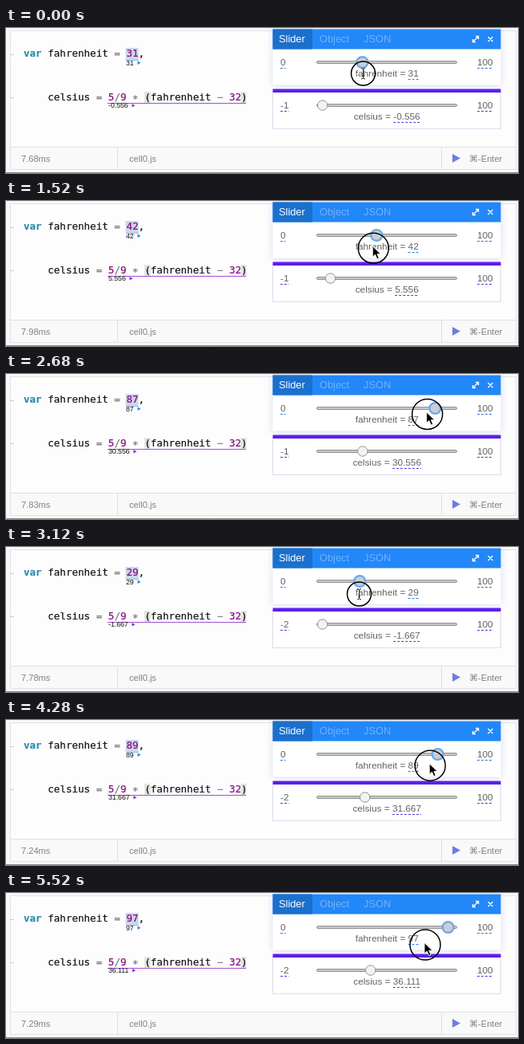
Recreate the animation shown at these times as an HTML page. Size 640x182 px, loop 5560 ms.

```html
<!DOCTYPE html>
<html lang="en">
<head>
<meta charset="utf-8">
<title>Temperature sliders</title>
<style>
  html, body { margin: 0; width: 100%; height: 100%; overflow: hidden; background: #fff; }
  svg { display: block; width: 100vw; height: 100vh; }
  text { font-family: "Liberation Sans", Arial, sans-serif; font-size: 11.8px; fill: #626262; }
  .code text {
    font-family: "DejaVu Sans Mono", monospace; font-size: 12.55px;
    color: #111; fill: currentColor; stroke: currentColor; stroke-width: .2;
  }
  .code tspan { fill: currentColor; stroke: currentColor; }
  .code .num { color: #86107f; }
  .code .op { color: #777; }
  .code .key { color: #2b8cab; font-weight: bold; }
  .code text.hint { font-family: "Liberation Sans", Arial, sans-serif; font-size: 8.7px; stroke: none; }
  .in { color: #2a86e2; }
  .out { color: #7a35d8; }
  .dash { stroke-width: 1; stroke-dasharray: 3 2; }
  .tabs text { font-size: 12.8px; fill: #6fb2fa; }
  .footer text { font-size: 11.1px; fill: #808080; }
  .panel { filter: drop-shadow(0 1px 5px rgba(90, 90, 210, .22)); }
</style>
</head>
<body>
<svg viewBox="0 0 640 182" preserveAspectRatio="none">
  <rect width="640" height="182" fill="#f8f8f8"/>
  <rect x="5.5" y="3.5" width="632" height="174" fill="#fdfdfd" stroke="#e2e2e4"/>
  <path d="M5 33.5h5M5 87.5h5" stroke="#ccc"/>

  <g class="code">
    <rect x="149.5" y="25" width="16" height="15" fill="#cbd7ea"/>
    <rect x="173" y="80" width="7.5" height="14" fill="#dfe4df"/>
    <rect x="293.5" y="80" width="7" height="14" fill="#dfe4df"/>
    <text x="22" y="36"><tspan class="key">var</tspan> fahrenheit <tspan class="op">=</tspan> <tspan class="num" id="literal"></tspan>,</text>
    <text x="52.3" y="90.5">celsius <tspan class="op">=</tspan> <tspan class="num">5</tspan><tspan class="op">/</tspan><tspan class="num">9</tspan> <tspan class="op">∗</tspan> (fahrenheit <tspan class="op">−</tspan> <tspan class="num">32</tspan>)</text>
    <path d="M150 40.5h16" stroke="#2a86e2" stroke-opacity=".5"/>
    <path d="M127 94.5h173" stroke="#a24fd6"/>
    <text class="hint in" id="inHint" x="150" y="46.5"></text>
    <path class="in" id="inMark" d="M0 41.5l4 2.2l-4 2.2z" fill="currentColor"/>
    <text class="hint out" id="outHint" x="128" y="100"></text>
    <path class="out" id="outMark" d="M0 95l4 2.2l-4 2.2z" fill="currentColor"/>
  </g>

  <g class="footer">
    <rect x="6" y="150" width="631" height="27" fill="#f9f9fa"/>
    <path d="M6 149.5H637M139.5 149V177M544.5 149V177" stroke="#e0e0e4" fill="none"/>
    <path d="M0 181.5H640" stroke="#8a8a8a"/>
    <text id="elapsed" x="19" y="168"></text>
    <text x="154" y="168">cell0.js</text>
    <path d="M558 158l10 5.5l-10 5.5z" fill="#6f7ce0"/>
    <text x="579" y="168" style="font-family:'Liberation Sans','DejaVu Sans',sans-serif">⌘-Enter</text>
  </g>

  <rect class="panel" x="333.5" y="1.5" width="285" height="70" fill="#fff"/>
  <g class="tabs">
    <rect x="333.5" y="1.5" width="285" height="25" fill="#2287f8"/>
    <rect x="333.5" y="1.5" width="49.5" height="25" fill="#1a70cc"/>
    <text x="341" y="18" style="fill:#fff">Slider</text>
    <text x="392" y="18">Object</text>
    <text x="447" y="18">JSON</text>
    <path d="M584 17l6 -6M587 10.5h3.5v3.5M583.5 14v3.5h3.5M602.5 11l6 6M608.5 11l-6 6" stroke="#fff" stroke-width="1.4" fill="none"/>
  </g>
  <rect x="333.5" y="79.5" width="285" height="47" fill="#fff" stroke="#dcdcf2"/>
  <rect x="333.5" y="76.5" width="285" height="4.5" fill="#5c1fea"/>
  <g id="sliders"></g>

  <g id="cursor">
    <circle id="halo" fill="none" stroke="#000" stroke-width="1.5"/>
    <path id="arrow" d="M-1 -2.5V11L2.2 8.1L4.6 13.5L7 12.5L4.7 7.3H9z" fill="#000" stroke="#fff" stroke-width=".9"/>
    <path id="beam" d="M-2.5 -6.5Q0 -6.5 0 -4.5Q0 -6.5 2.5 -6.5M0 -5V5.5M-2.5 7Q0 7 0 5Q0 7 2.5 7M-1.5 3h3" fill="none" stroke="#222"/>
  </g>
</svg>
<script>
const LOOP = 5560, STEP = 40, KNOB_LAG = 50;
const COLDEST_AT = 3120; // the celsius scale widens here
const $ = id => document.getElementById(id);

// Turning points of the hand
const swings = [
  { t: 0, x: 446.5, y: 57 }, { t: 720, x: 537, y: 45 }, { t: 880, x: 537, y: 45 },
  { t: 1630, x: 455, y: 60 }, { t: 2390, x: 551, y: 48 }, { t: 2480, x: 551, y: 48 },
  { t: 3120, x: 441.5, y: 59 }, { t: 3280, x: 441.5, y: 59 },
  { t: 3810, x: 551, y: 54 }, { t: 4080, x: 551, y: 54 }, { t: 4740, x: 452, y: 69 },
  { t: 5340, x: 558, y: 58 }, { t: 5440, x: 558, y: 60 }, { t: 5600, x: 490, y: 70 },
];

function handAt(t) {
  const next = swings.findIndex(s => s.t > t);
  const a = swings[next - 1], b = swings[next];
  const k = (1 - Math.cos(Math.PI * (t - a.t) / (b.t - a.t))) / 2;
  return { x: a.x + (b.x - a.x) * k, y: a.y + (b.y - a.y) * k };
}

const clamp01 = v => Math.max(0, Math.min(1, v));

// 1 while the hand rests on the text, 0 while it drags
const restAt = t => Math.max(...[0, 3200].map(at => clamp01(2 - Math.abs(t - at) / 80)));

function makeSlider(name, y, color, focused) {
  const g = document.createElementNS("http://www.w3.org/2000/svg", "g");
  g.setAttribute("transform", `translate(0 ${y})`);
  g.innerHTML = `
    <text class="min" x="343" y="4"></text>
    <path class="dash minLine" stroke="${color}"/>
    <text x="589" y="4">100</text>
    <path class="dash" d="M589 7.5h20" stroke="${color}"/>
    <rect x="388.5" y="-1.5" width="175" height="3" rx="1.5" fill="#c8c8c8" stroke="#929292"/>
    <g class="knob">
      ${focused ? '<circle r="7" fill="none" stroke="#62aaf0" stroke-width="2.2"/>' : ""}
      <circle r="6.2" fill="${focused ? "#c9ced6" : "#f3f3f3"}" stroke="${focused ? "#7aa7d6" : "#929292"}"/>
    </g>
    <text x="476.2" y="17.6" text-anchor="middle"><tspan>${name} = </tspan><tspan class="value"></tspan></text>
    <path class="dash valueLine" stroke="${color}"/>`;
  $("sliders").append(g);
  const part = c => g.querySelector("." + c);
  const value = part("value"), min = part("min");
  return (v, low) => {
    value.textContent = v;
    min.textContent = low;
    part("knob").setAttribute("transform", `translate(${395 + 162.5 * (v - low) / (100 - low)} 0)`);
    part("minLine").setAttribute("d", `M343 7.5h${min.getComputedTextLength()}`);
    const right = 476.2 + value.parentNode.getComputedTextLength() / 2;
    const width = value.getComputedTextLength();
    part("valueLine").setAttribute("d", `M${right - width} 21.5h${width}`);
  };
}

const setFahrenheit = makeSlider("fahrenheit", 43, "#2a78e8", true);
const setCelsius = makeSlider("celsius", 97, "#5538e8", false);

function setHint(name, value) {
  const label = $(name + "Hint");
  label.textContent = value;
  const x = +label.getAttribute("x") + label.getComputedTextLength() + 4.8;
  $(name + "Mark").setAttribute("transform", `translate(${x} 0)`);
}

function evalTime(t) {
  const noise = Math.abs(Math.sin(t + 1) * 43758.5453) % 1;
  return (7.2 + 1.6 * noise * noise).toFixed(2) + "ms";
}

function draw(time) {
  const t = Math.floor((time % LOOP) / STEP) * STEP;
  const dragged = handAt(Math.max(0, t - KNOB_LAG)).x;
  const f = Math.round((dragged - 395.5) / 1.62);
  const c = +((f - 32) * 5 / 9).toFixed(3);
  setFahrenheit(f, 0);
  setCelsius(c, t < COLDEST_AT ? -1 : -2);
  $("literal").textContent = f;
  setHint("in", f);
  setHint("out", c);
  $("elapsed").textContent = evalTime(t);

  const hand = handAt(t), rest = restAt(t);
  $("cursor").setAttribute("transform", `translate(${hand.x} ${hand.y})`);
  $("halo").setAttribute("r", 19 - 4 * rest);
  $("beam").style.display = rest > .5 ? "" : "none";
  $("arrow").style.display = rest > .5 ? "none" : "";
}

const start = performance.now();
function tick() {
  draw(performance.now() - start);
  requestAnimationFrame(tick);
}
tick();
</script>
</body>
</html>
```
